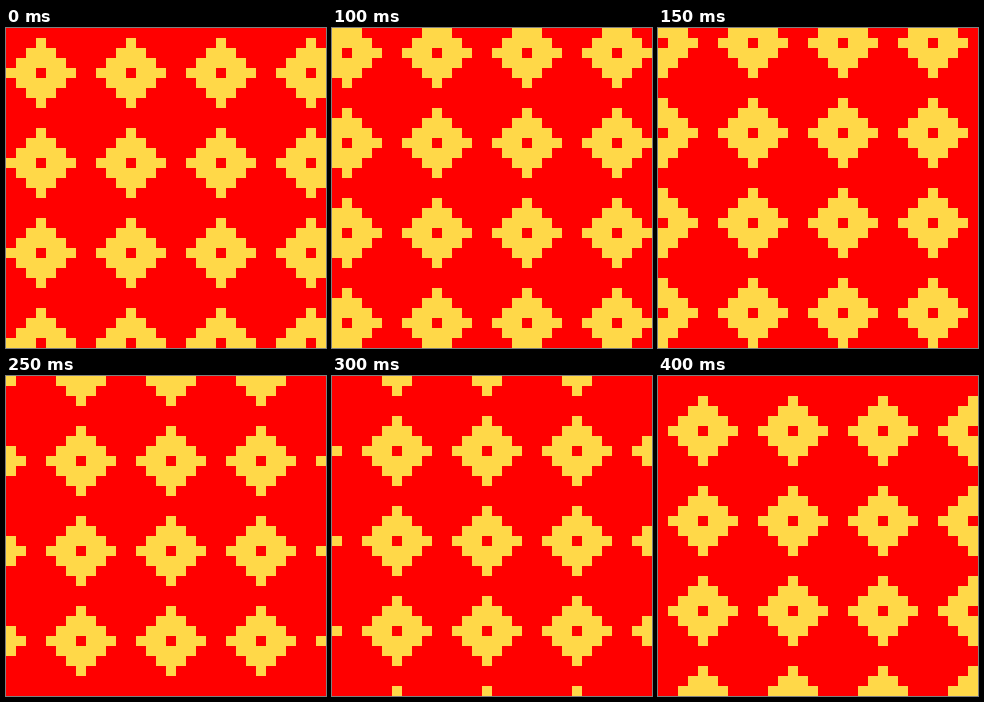
These frames come from a looping animation (320 px wide and 320 px high, 450 ms). An HTML page:

```html
<!DOCTYPE html>
<html lang="en">
<head>
<meta charset="utf-8">
<title>Drifting diamonds</title>
<style>
  html, body {
    margin: 0;
    width: 100%;
    height: 100%;
    overflow: hidden;
    background: #f00;
  }
  svg {
    display: block;
    width: 320px;
    height: 320px;
  }
  .tiles {
    animation: drift 450ms steps(9) infinite;
  }
  /* One tile is 90px wide: nine hard steps of 10px */
  @keyframes drift {
    to { transform: translate(-90px, -90px); }
  }
</style>
</head>
<body>
<svg viewBox="0 0 320 320" shape-rendering="crispEdges">
  <defs>
    <pattern id="diamond" width="90" height="90" patternUnits="userSpaceOnUse">
      <path fill="#ffd848" fill-rule="evenodd" d="M30 10h10v10h10v10h10v10h10v10h-10v10h-10v10h-10v10h-10v-10h-10v-10h-10v-10h-10v-10h10v-10h10v-10h10zM30 40h10v10h-10z"/>
    </pattern>
  </defs>
  <rect class="tiles" width="410" height="410" fill="url(#diamond)"/>
</svg>
</body>
</html>
```
